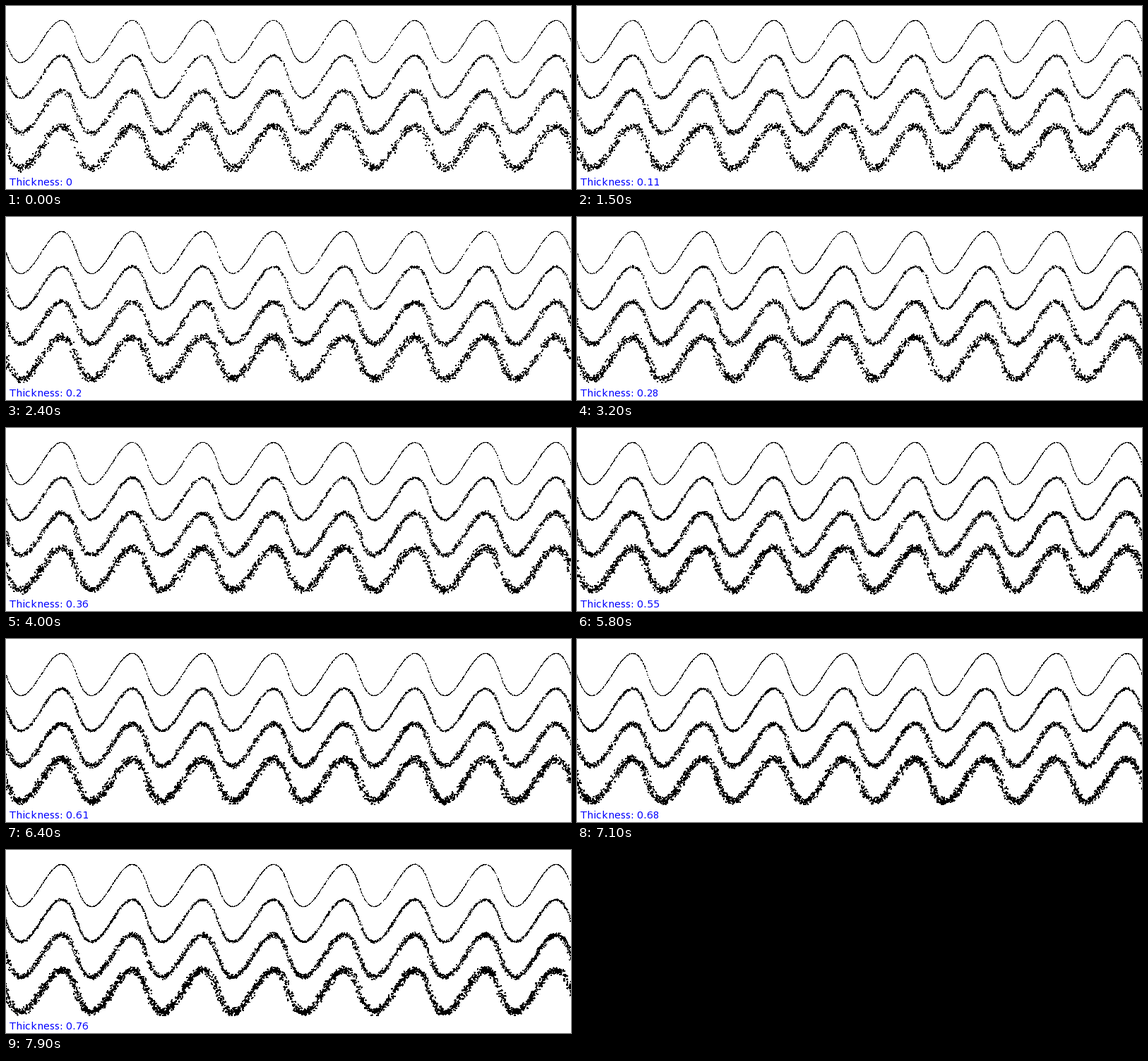
These frames come from a looping animation (800x260 px, 8000 ms). A matplotlib script:

```python
import numpy as np
import matplotlib.pyplot as plt
from matplotlib.animation import FuncAnimation

W, H, DPI = 800, 260, 100
PERIOD, AMP = 100, 30
MARGIN = 8
ROWS = [(50, 0.5), (100, 2), (150, 4), (200, 6)]   # centre line, scatter radius

# sample points of a unit square, used to fill each speck
GRID = np.linspace(-0.5, 0.5, 4)
U, V = (g.reshape(-1, 1) for g in np.meshgrid(GRID, GRID))

plt.rcParams["text.hinting_factor"] = 1   # whole-pixel letter spacing
fig = plt.figure(figsize=(W / DPI, H / DPI), dpi=DPI, facecolor="white")
ax = fig.add_axes([0, 0, 1, 1])
ax.set_axis_off()
canvas = ax.imshow(np.full((H, W), 255, np.uint8), cmap="gray", vmin=0, vmax=255,
                   interpolation="nearest", aspect="auto", extent=(0, W, H, 0))
label = ax.text(5, 255, "", color="#0000ff", family="DejaVu Sans",
                size=14 * 72 / DPI, va="baseline")


def wave(x):
    """Chain of cubic curves, one per period, starting at the centre line."""
    t = (x / PERIOD) % 1
    return AMP * t * (1 - t) * (1 - 2 * t) * 6 * np.sqrt(3)


def draw_row(img, rng, centre, radius, thickness):
    count = int(2000 * (1 + 0.8 * thickness))
    x = rng.uniform(-MARGIN, W + MARGIN, count)
    r = 0.95 * radius * rng.random(count)
    a = rng.uniform(0, 2 * np.pi, count)
    px = x + r * np.cos(a)
    py = centre + wave(x) + r * np.sin(a)

    # tilted square specks, larger in the wider rows
    size = radius * (0.15 + 0.06 * thickness)
    b = rng.uniform(0, np.pi, count)
    c, s = size * np.cos(b), size * np.sin(b)
    sx = np.floor(px + U * c - V * s).astype(int)
    sy = np.floor(py + U * s + V * c + 0.5).astype(int)
    ok = (sx >= 0) & (sx < W) & (sy >= 0) & (sy < H)
    img[sy[ok], sx[ok]] = 0


def update(frame):
    n = max(0, frame - 4)
    thickness = n / 99
    rng = np.random.default_rng(100 + n)
    img = np.full((H, W), 255, np.uint8)
    for centre, radius in ROWS:
        draw_row(img, rng, centre, radius, thickness)
    canvas.set_data(img)
    label.set_text(f"Thickness: {round(thickness, 2):g}")
    return canvas, label


anim = FuncAnimation(fig, update, frames=80, interval=100, repeat=True,
                     repeat_delay=0, blit=False)
plt.show()
```
